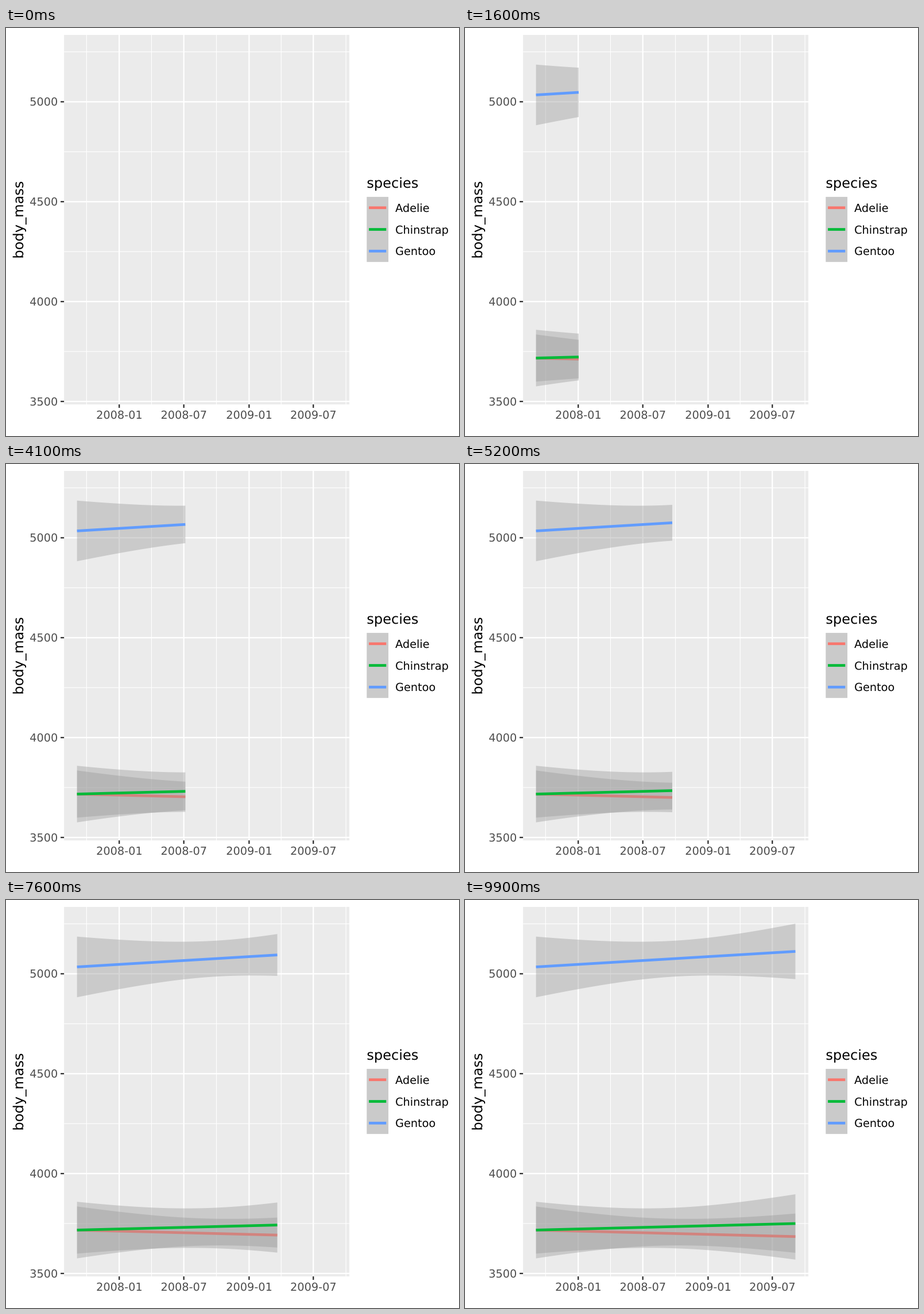
Write a matplotlib script that moves like this. It is 789x710 px and loops after 10 s.

```python
import matplotlib.pyplot as plt
import numpy as np
from matplotlib.animation import FuncAnimation
from matplotlib.patches import PathPatch, Polygon, Rectangle
from matplotlib.textpath import TextPath
from matplotlib.transforms import Affine2D

W, H, DPI = 789, 710, 64
FRAMES, STEPS = 100, 80
PT = 157.8 / 72                        # pixels per text point
LINE = 2.338                           # width of major grid lines, px
LEFT, RIGHT, TOP, BOTTOM = 101.1, 598.0, 12.0, 655.0
X0, X1 = 123.67, 575.42                # first and last survey date
DAY = (X1 - X0) / 731
JAN08 = X0 + 119 * DAY

# name, colour, yearly counts, yearly mean mass, residual sd, t quantile
SPECIES = [
    ("Adelie", "#F8766D", (49, 50, 52), (3696.4, 3742.0, 3664.9), 459, 1.976),
    ("Chinstrap", "#00BA38", (26, 18, 24), (3694.2, 3800.0, 3725.0), 387, 1.997),
    ("Gentoo", "#619CFF", (34, 46, 43), (5070.6, 5019.6, 5140.7), 503, 1.980),
]

plt.rcParams["path.snap"] = False
fig = plt.figure(figsize=(W / DPI, H / DPI), dpi=DPI, facecolor="white")
ax = fig.add_axes([0, 0, 1, 1])
ax.set(xlim=(0, W), ylim=(H, 0))
ax.axis("off")


def mass_y(mass):
    return 649.9 - (mass - 3500) * 521.5 / 1500


def rect(x0, y0, x1, y1, color, **kw):
    ax.add_patch(Rectangle((x0, y0), x1 - x0, y1 - y0, fc=color, lw=0, **kw))


def line(xs, ys, color, px, **kw):
    return ax.plot(xs, ys, color=color, lw=px * 72 / DPI,
                   solid_capstyle="butt", **kw)[0]


def text(x, y, s, points, color="black", align="pen", angle=0):
    path = TextPath((0, 0), s, size=points * PT, prop={"family": "DejaVu Sans"})
    box = path.get_extents()
    shift = {"pen": 0, "right": box.x1, "center": (box.x0 + box.x1) / 2}[align]
    place = Affine2D().translate(-shift, 0).scale(1, -1).rotate_deg(-angle)
    place.translate(x, y)
    ax.add_patch(PathPatch(path, fc=color, lw=0, transform=place + ax.transData))


def draw_panel():
    rect(LEFT, TOP, RIGHT, BOTTOM, "#EBEBEB", zorder=0)
    days = np.array([0, 182, 366, 547])
    minor_days = [-92, 91, 274, 456.5, 639]
    for mass in range(3750, 5251, 500):
        line([LEFT, RIGHT], [mass_y(mass)] * 2, "white", LINE / 2, zorder=1)
    for d in minor_days:
        line([JAN08 + d * DAY] * 2, [TOP, BOTTOM], "white", LINE / 2, zorder=1)
    for mass in range(3500, 5001, 500):
        y = mass_y(mass)
        line([LEFT, RIGHT], [y, y], "white", LINE, zorder=1)
        line([LEFT - 6, LEFT], [y, y], "#333333", LINE)
        text(89.0, round(y + 7), str(mass), 8.8, "#4D4D4D", "right")
    for d, label in zip(days, ("2008-01", "2008-07", "2009-01", "2009-07")):
        x = JAN08 + d * DAY
        line([x, x], [TOP, BOTTOM], "white", LINE, zorder=1)
        line([x, x], [BOTTOM, BOTTOM + 6], "#333333", LINE)
        text(x, 680, label, 8.8, "#4D4D4D", "center")
    text(30, 333.5, "body_mass", 11, align="center", angle=90)


def draw_legend():
    x, y, key = 628.3, 293.9, 37.74
    text(x, 278, "species", 11)
    rect(x, y, x + key, y + 3 * key, "#CACACA", zorder=0)
    for i, (name, color, *_) in enumerate(SPECIES):
        mid = y + (i + 0.5) * key
        line([x + 0.1 * key, x + 0.9 * key], [mid, mid], color, 2 * LINE)
        text(x + key + 12, round(mid + 7), name, 8.8)


def fit(counts, means, sd, t):
    """Least-squares line and its confidence half-width on the date grid."""
    u = np.linspace(0, 1, STEPS)
    year, n = np.array([0, 0.5, 1]), np.array(counts)
    total = n.sum()
    mid, mean = n @ year / total, n @ np.array(means) / total
    sxx = n @ (year - mid) ** 2
    slope = (n * (year - mid)) @ (np.array(means) - mean) / sxx
    half = t * sd * np.sqrt(1 / total + (u - mid) ** 2 / sxx)
    centre = mean + slope * (u - mid)
    return [mass_y(v) for v in (centre, centre + half, centre - half)]


draw_panel()
draw_legend()

grid = np.arange(STEPS)
# each grid point is reached on a whole frame
arrival = np.round(grid * (FRAMES - 1) / (STEPS - 1))
trends = []
for k, (_, color, *stats) in enumerate(SPECIES):
    band = Polygon([[0, 0]] * 3, fc="#999999", alpha=0.4, lw=0, zorder=3 + k)
    ax.add_patch(band)
    trends.append((band, line([], [], color, 2 * LINE, zorder=3.5 + k), fit(*stats)))


def update(frame):
    end = np.interp(frame, arrival, grid)
    pos = np.append(grid[grid < end], end)
    xs = X0 + pos / (STEPS - 1) * (X1 - X0)
    for band, trend, curves in trends:
        centre, upper, lower = (np.interp(pos, grid, c) for c in curves)
        band.set_xy(np.column_stack([np.r_[xs, xs[::-1]],
                                     np.r_[upper, lower[::-1]]]))
        trend.set_data(xs, centre)
        band.set_visible(frame > 0)
        trend.set_visible(frame > 0)


anim = FuncAnimation(fig, update, frames=FRAMES, interval=100,
                     repeat=True, repeat_delay=0)
plt.show()
```
